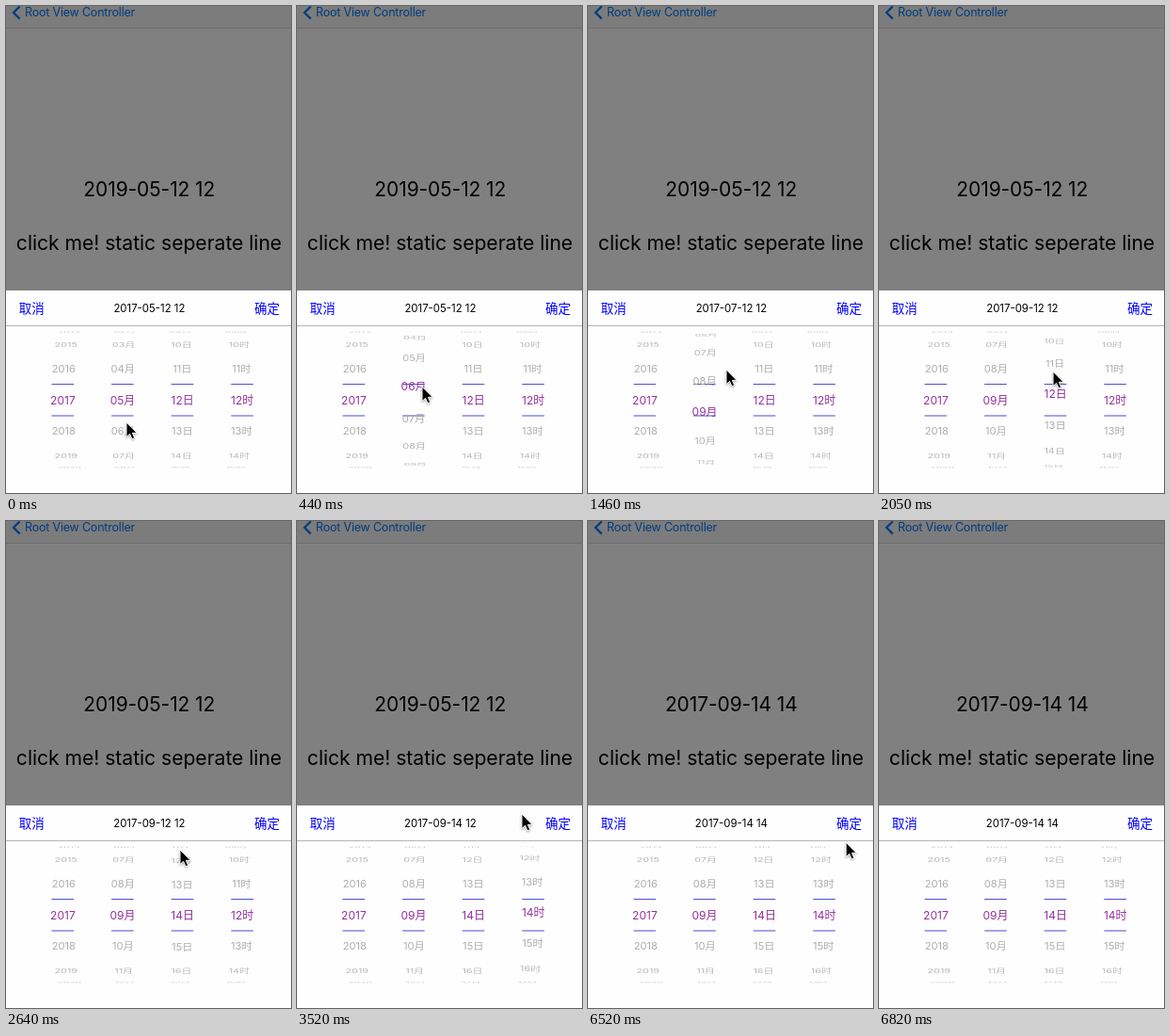
An HTML page that plays this animation: 303x517 px, repeating every 6.97 s.

```html
<!DOCTYPE html>
<html lang="zh">
<head>
<meta charset="utf-8">
<title>Date picker</title>
<style>
  html, body { margin: 0; width: 100%; height: 100%; overflow: hidden; background: #808080; }
  svg { display: block; width: 303px; height: 517px; }
  text { font-family: Inter, "Noto Sans CJK SC", "Noto Sans CJK", sans-serif; text-anchor: middle; }
  .label { font-size: 21px; letter-spacing: -.005em; }
  .prompt { font-size: 21.2px; letter-spacing: -.003em; }
  .title { font-size: 11.4px; }
  .button { font-size: 13.5px; fill: #00f; }
  .back { font-size: 12.5px; letter-spacing: -.2px; fill: #003d80; text-anchor: start; }
  .row { font-size: 11.3px; fill: #a9a9a9; }
  .row.picked { font-size: 12px; fill: #96309c; }
  .mark { fill: #4d4fd2; }
  #cursor { filter: drop-shadow(0 1px 1px rgba(0, 0, 0, .35)); }
</style>
</head>
<body>
<svg viewBox="0 0 303 517">
  <defs><clipPath id="drum"><rect y="345.5" width="303" height="145"/></clipPath></defs>
  <rect width="303" height="517" fill="#808080"/>
  <rect width="303" height="23" fill="#7c7c7c"/>
  <rect y="23" width="303" height="1" fill="#6c6c6c"/>
  <path d="M14.6 .4 8 7l6.6 6.6" fill="none" stroke="#003d80" stroke-width="2.3"/>
  <text class="back" x="20" y="11">Root View Controller</text>
  <text class="label" id="label" x="152.3" y="202"></text>
  <text class="prompt" x="152" y="258.6">click me! static seperate line</text>
  <rect y="302" width="303" height="215" fill="#fefefe"/>
  <rect y="339" width="303" height="1" fill="#b4b4b4"/>
  <text class="button" x="27.3" y="326">取消</text>
  <text class="button" x="277.5" y="326">确定</text>
  <text class="title" id="title" x="152.4" y="325"></text>
  <g id="wheels" clip-path="url(#drum)"></g>
  <path id="cursor" d="M0 0V15.6L3.6 12.3 6 17.8 8.7 16.6 6.4 11.3H11.2Z"
    fill="#000" stroke="#fff" stroke-width="1" stroke-linejoin="round"/>
</svg>
<script>
const LOOP = 6970, STEP = 147, LEAD = 13;
const CENTER_Y = 418.3, RADIUS = 73.5, ROW_ANGLE = 26.5 * Math.PI / 180;
const DEPTH = 800, EYE_X = 155, FIRST_X = 60.4, COLUMN = 63.6;
const CONFIRMED = 4100;
const $ = id => document.getElementById(id);

const clamp = p => Math.min(1, Math.max(0, p));
const smooth = p => p * p * (3 - 2 * p);
const flick = p => smooth(1 - (1 - p) ** 1.5);
const pad = n => String(n).padStart(2, "0");

// Each spin: start time, end time, value reached
const WHEELS = [
  { unit: "", first: 2017, spins: [] },
  { unit: "月", first: 5, spins: [[0, 860, 7], [1050, 1760, 9]] },
  { unit: "日", first: 12, spins: [[1930, 2770, 14]] },
  { unit: "时", first: 12, spins: [[2940, 3520, 14.09], [3520, 3820, 14]] }
];

// Turning points of the pointer: time, x, y
const PATH = [
  [0, 128, 442], [430, 133, 404], [860, 144, 423], [1050, 144, 423],
  [1470, 147, 386], [1760, 206, 408], [2050, 185, 388], [2640, 185, 349],
  [2940, 238, 389], [3520, 239, 311], [3960, 274, 316], [6380, 274, 316], [6740, 276, 540]
];

const valueAt = ({ first, spins }, t) => spins.reduce(
  (v, [from, to, goal]) => v + (goal - v) * flick(clamp((t - from) / (to - from))), first);

const settledAt = ({ first, spins }, t) => spins.reduce(
  (v, [, to, goal]) => to < t ? Math.round(goal) : v, first);

function pointerAt(t) {
  const i = PATH.findIndex(p => p[0] > t);
  if (i < 0) return PATH.at(-1).slice(1);
  const [t0, x0, y0] = PATH[i - 1], [t1, x1, y1] = PATH[i];
  const p = smooth((t - t0) / (t1 - t0));
  return [x0 + (x1 - x0) * p, y0 + (y1 - y0) * p];
}

function add(tag, attrs) {
  const el = document.createElementNS("http://www.w3.org/2000/svg", tag);
  for (const name in attrs) el.setAttribute(name, attrs[name]);
  return $("wheels").appendChild(el);
}

WHEELS.forEach((wheel, i) => {
  wheel.x = FIRST_X + i * COLUMN;
  for (const y of [401, 434.5]) add("rect", { class: "mark", x: wheel.x - 11.9, y, width: 23.6, height: 1 });
  wheel.rows = Array.from({ length: 9 }, () => add("text", { y: 4.3 }));
});

function turn(wheel, t) {
  const value = valueAt(wheel, t), nearest = Math.round(value);
  wheel.rows.forEach((row, i) => {
    const n = nearest + i - 4;
    const angle = (n - value) * ROW_ANGLE;
    const cos = Math.cos(angle);
    const scale = 1 / (1 + RADIUS * (1 - cos) / DEPTH);
    const x = EYE_X + (wheel.x - EYE_X) * scale;
    const y = CENTER_Y + RADIUS * Math.sin(angle);
    row.style.display = cos > 0.03 ? "" : "none";
    row.style.opacity = 0.6 + 0.4 * cos;
    row.textContent = pad(n) + wheel.unit;
    row.setAttribute("class", n === nearest ? "row picked" : "row");
    row.setAttribute("transform", `translate(${x} ${y}) scale(${scale} ${scale * cos})`);
  });
}

let shown = -1;
function draw(time) {
  const t = Math.max(0, Math.floor((time + LEAD) / STEP) * STEP - LEAD);
  if (t === shown) return;
  shown = t;
  WHEELS.forEach(wheel => turn(wheel, t));
  const [year, month, day, hour] = WHEELS.map(wheel => pad(settledAt(wheel, t)));
  const date = `${year}-${month}-${day} ${hour}`;
  $("title").textContent = date;
  $("label").textContent = t < CONFIRMED ? "2019-05-12 12" : date;
  $("cursor").setAttribute("transform", `translate(${pointerAt(t)})`);
}

const start = performance.now();
function tick() {
  draw((performance.now() - start) % LOOP);
  requestAnimationFrame(tick);
}
tick();
</script>
</body>
</html>
```
